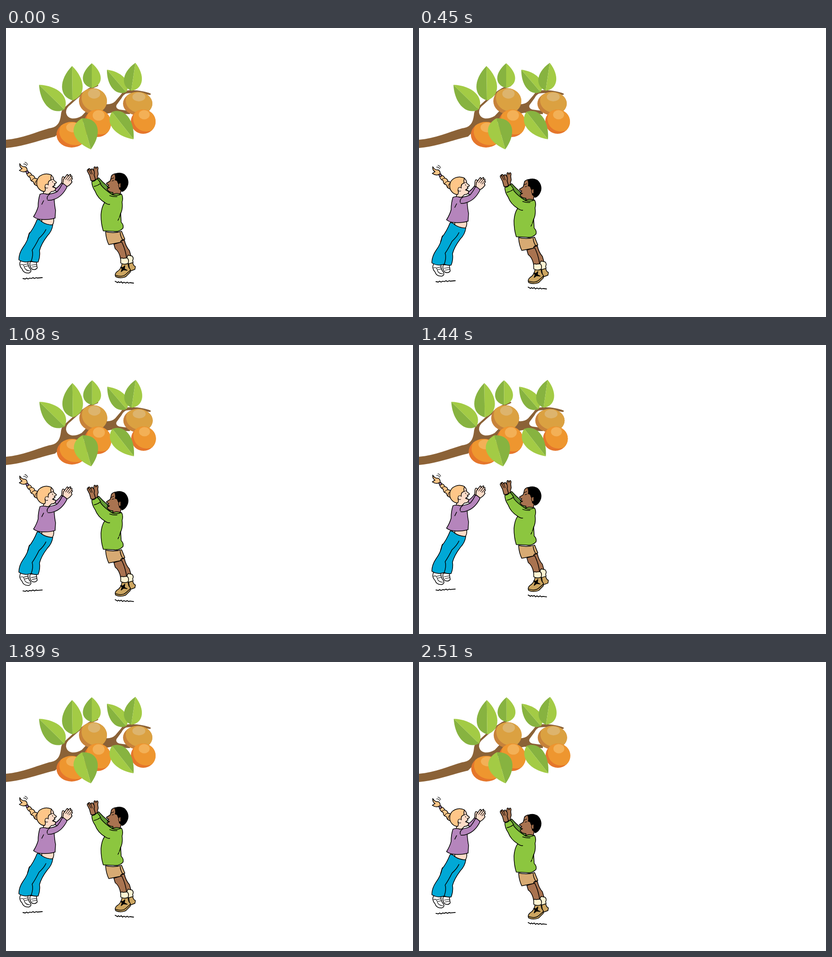
Recreate the animation shown at these times as an HTML page. Size 887 px wide and 631 px high, loop 2590 ms.

```html
<!DOCTYPE html>
<html lang="en">
<head>
<meta charset="utf-8">
<title>Picking fruit</title>
<style>
  html, body { margin: 0; width: 100%; height: 100%; overflow: hidden; background: #fff; }
  svg { display: block; }
  .kid path { stroke: #000; stroke-width: 1.5; stroke-linecap: round; stroke-linejoin: round; fill: none; }
  .kid .hair { fill: #fec688; }
  .kid .pale { fill: #fddcc8; }
  .kid .purple { fill: #b585bc; }
  .kid .blue { fill: #00a8d6; }
  .kid .white { fill: #fff; }
  .kid .brown { fill: #a97350; }
  .kid .green { fill: #8cc63f; }
  .kid .shade { fill: #639b35; }
  .kid .tan { fill: #d7aa73; }
  .kid .boot { fill: #cda661; }
  .kid .cream { fill: #fff4d2; }
  .kid .black { fill: #000; }
  .kid .thin { stroke-width: 1.1; }
  .kid .ground { stroke-width: 1.8; }
</style>
</head>
<body>
<svg width="887" height="631" viewBox="0 0 887 631">
  <path fill="#8b6237" d="M0 244C35 241 66 227 94 219C112 217 118 207 120 187Q121 179 127 174L149 154C166 141 181 128 200 124Q203 126 198 128C179 135 160 149 141 167Q130 175 131 185C133 198 148 202 165 192L181 175L215 166Q230 168 238 160L250 146Q255 137 268 136C286 135 304 139 315 143Q317 146 312 146C294 142 276 141 262 143Q256 145 252 153L241 168Q238 175 247 178L270 181V188Q247 187 230 185Q209 188 180 202L139 215Q119 223 107 237C76 244 37 259 0 262Z"/>
  <g id="crop"></g>

  <g id="girl" class="kid">
    <path class="hair" d="M46 312Q38 317 29 311L35 307Q29 304 30 296Q34 304 42 303Q47 306 46 312Z"/>
    <path class="thin" d="M38 297Q43 296 45 301M41 293Q46 294 47 299"/>
    <path class="hair" d="M47 314Q55 316 56 321Q62 322 63 328Q70 329 73 335L69 345Q60 343 60 336Q52 334 53 327Q46 324 45 317Z"/>
    <path class="thin" d="M56 321Q51 322 50 325M63 328Q57 329 56 334M68 332Q63 335 63 342"/>
    <path class="purple" d="M43 313L48 312L49 317L45 318Z"/>
    <path class="pale" d="M121 340L122 329Q123 322 127 326L129 333L126 344Z"/>
    <path class="purple" d="M105 353Q115 347 121 338L128 345L112 359Z"/>
    <path class="pale" d="M98 321Q104 325 104 332L110 337Q109 340 105 340L107 343L102 346L108 349Q109 357 99 357L93 363L81 362L86 340Z"/>
    <path class="hair" d="M99 321C87 315 68 320 67 337C66 348 75 357 84 357Q87 354 85 348Q86 341 92 343Q91 333 98 332Q97 326 99 321Z"/>
    <path class="pale thin" d="M92 342Q85 339 85 346Q86 351 91 349"/>
    <path class="thin" d="M98 332L103 330M101 335L102 337M101 347L106 349"/>
    <path class="pale" d="M78 416L104 416Q105 425 101 430Q87 430 78 423Z"/>
    <path class="purple" d="M74 363Q81 360 89 363Q104 362 112 357Q118 350 123 340Q130 340 133 347C127 359 117 370 105 374Q106 389 108 398L107 415Q94 419 79 418Q68 418 60 412Q67 401 70 390Q70 375 74 363Z"/>
    <path d="M105 374Q97 377 91 376M95 363Q88 368 90 374M82 377L78 385"/>
    <path class="pale" d="M124 339L125 331L133 320Q136 319 135 324L139 320Q143 318 140 324Q146 321 143 327Q147 328 142 333L144 336Q139 344 133 346Z"/>
    <path class="thin" d="M135 324L130 331M140 324L134 332M143 327L137 334"/>
    <path class="white" d="M32 508Q27 518 35 526Q38 536 50 535Q57 532 53 526Q47 520 48 510Z"/>
    <path class="white" d="M53 510Q50 519 56 526Q63 530 68 524L66 511Z"/>
    <path class="thin" d="M32 517Q38 514 40 522T52 530M39 517L47 515M41 521L49 519M55 518L66 516M57 522L67 520"/>
    <path class="blue" d="M68 418Q74 418 78 423Q88 430 102 430Q100 444 90 454Q77 471 73 486Q75 499 70 511Q62 512 55 509L45 511Q35 511 28 506Q28 492 37 479Q48 464 50 450Q60 438 68 418Z"/>
    <path d="M87 440Q83 449 72 459Q64 475 57 485Q60 495 55 509M47 460L51 447"/>
    <path class="ground" d="M37 547L42 548L45 546L48 548L52 546L55 547L59 545L62 547L66 545L68 546L79 545"/>
  </g>

  <g id="boy" class="kid">
    <path class="brown" d="M192 330L190 315L192 304Q195 301 196 307L198 303Q202 303 200 311L201 319Q198 327 201 332Z"/>
    <path class="shade" d="M196 332L202 327Q211 337 222 346L239 361L226 365L206 351Z"/>
    <path class="brown" d="M238 318Q229 320 229 327L227 334L219 339Q219 342 224 343L221 347L225 349L220 351Q223 359 233 359L233 365L249 363L254 340Z"/>
    <path class="black" d="M237 319Q248 314 258 320C266 327 268 338 264 346Q260 355 253 357L247 351Q247 341 244 338Q243 332 238 332Q240 326 237 319Z"/>
    <path class="brown thin" d="M250 339Q246 337 245 344Q246 351 250 348Z"/>
    <path class="thin" d="M229 330L235 327M231 334L235 333M221 347L226 348"/>
    <path class="green" d="M187 335Q194 335 198 329Q205 334 207 343Q216 354 232 364Q238 359 252 363Q256 370 253 380Q255 394 250 405L251 424Q257 430 255 437Q247 446 234 444L212 443Q207 428 207 408Q208 391 215 381Q200 372 194 356Q187 346 187 335Z"/>
    <path d="M215 381Q222 386 226 385M232 364Q241 367 251 363M226 366Q235 369 242 368M250 404L247 414M246 416L244 420M192 346Q200 344 205 340"/>
    <path class="brown" d="M185 333L182 322L177 312Q177 307 181 311L179 308Q183 305 185 311Q187 304 190 310Q194 312 192 321Q194 327 195 331Q191 335 185 333Z"/>
    <path class="thin" d="M181 311L185 319M185 311L188 319"/>
    <path class="brown" d="M249 465L258 463Q261 477 269 486L273 500L263 502L256 486Z"/>
    <path class="brown" d="M235 472L252 467Q260 482 263 503L250 505Q247 488 238 482Z"/>
    <path class="tan" d="M217 445Q236 449 252 444L259 461L251 464L249 468L224 473Q218 461 217 445Z"/>
    <path d="M249 447Q249 454 254 462"/>
    <path class="boot" d="M267 513L276 511Q277 519 282 521L281 527L270 531Z"/>
    <path class="cream" d="M263 502L266 496L275 498Q279 503 276 507L277 512L267 515Z"/>
    <path class="boot" d="M253 514L266 513Q266 523 271 527L271 533L261 543Q249 548 239 543Q236 537 242 532Q251 527 253 514Z"/>
    <path d="M239 540Q253 545 261 538L271 529"/>
    <path class="black" d="M250 522L255 523L259 519L258 526L264 529L256 528L251 532L253 526Z"/>
    <path class="cream" d="M250 507Q249 500 255 503L264 502Q269 506 266 514Q257 518 250 513Z"/>
    <path class="ground" d="M238 553L243 556L245 554L248 556L251 554L254 557L257 555L261 557L264 555L267 557L270 556L278 557"/>
  </g>
</svg>
<script>
  const crop = document.getElementById('crop');
  const ripe = ['#e5762b', '#ee962f', '#f3b056'];
  const dull = ['#c7823a', '#dba141', '#ddb46d'];
  const light = '#a3cb45', dark = '#87b340';

  const ellipse = (x, y, rx, ry, fill) =>
    `<ellipse cx="${x}" cy="${y}" rx="${rx}" ry="${ry}" fill="${fill}"/>`;

  // The lit part leaves a crescent of shade at the lower left.
  function fruit(x, y, rx, ry, [shade, body, shine]) {
    const dx = rx * Math.SQRT1_2, dy = ry * Math.SQRT1_2, flat = 1.06;
    return ellipse(x, y, rx, ry, shade) +
      `<path fill="${body}" d="M${x - dx} ${y - dy}A${rx} ${ry} 0 0 1 ${x + dx} ${y + dy}` +
      `A${rx * flat} ${ry * flat} 0 0 1 ${x - dx} ${y - dy}Z"/>` +
      ellipse(x + rx * .08, y - ry * .57, rx * .44, ry * .38, shine);
  }

  // Two halves bulging to either side of the line from stem to tip.
  function leaf(x, y, tipX, tipY, bulge, leftFill, rightFill) {
    const dx = tipX - x, dy = tipY - y, len = Math.hypot(dx, dy);
    const half = (side, fill) => {
      const at = k => `${x + dx * k + side * bulge * dy / len} ${y + dy * k - side * bulge * dx / len}`;
      return `<path fill="${fill}" d="M${x} ${y}C${at(.12)} ${at(.6)} ${tipX} ${tipY}Z"/>`;
    };
    return half(1, leftFill) + half(-1, rightFill);
  }

  crop.innerHTML =
    leaf(127, 178, 72, 124, 28, dark, light) +
    leaf(145, 158, 144, 83, 30, dark, light) +
    leaf(187, 131, 187, 77, 26, dark, light) +
    leaf(262, 140, 220, 91, 23, dark, light) +
    leaf(273, 137, 282, 76, 26, dark, light) +
    fruit(189.5, 159.5, 30.5, 28, dull) +
    fruit(287, 165, 32, 25.5, dull) +
    fruit(199.5, 208, 29.5, 30, ripe) +
    fruit(299, 204.5, 27, 26.5, ripe) +
    fruit(143, 233, 33, 28, ripe) +
    leaf(166, 197, 185, 265, 35, dark, light) +
    leaf(231, 183, 278, 243, 28, dark, light);

  const STEP = 90, LOOP = 2590, LAST_AT = 2510, PERIOD = 21;

  // Triangle wave, zero at step 0, highest at the given step.
  function bounce(step, peakStep, range) {
    const distance = s => {
      const p = (((s - peakStep) % PERIOD) + PERIOD) % PERIOD;
      return Math.min(p, PERIOD - p);
    };
    return (distance(0) - distance(step)) * 2 * range / PERIOD;
  }

  const move = (id, x, y) =>
    document.getElementById(id).setAttribute('transform', `translate(${x} ${y})`);

  function draw() {
    const t = performance.now() % LOOP;
    const step = t >= LAST_AT ? 28 : Math.floor(t / STEP);
    const boyY = bounce(step, 6.6, 26.8);
    move('boy', 0, boyY);
    move('girl', 0, bounce(step, 3.9, 25.3));
    move('crop', boyY * .235, 0);
    requestAnimationFrame(draw);
  }
  draw();
</script>
</body>
</html>
```
